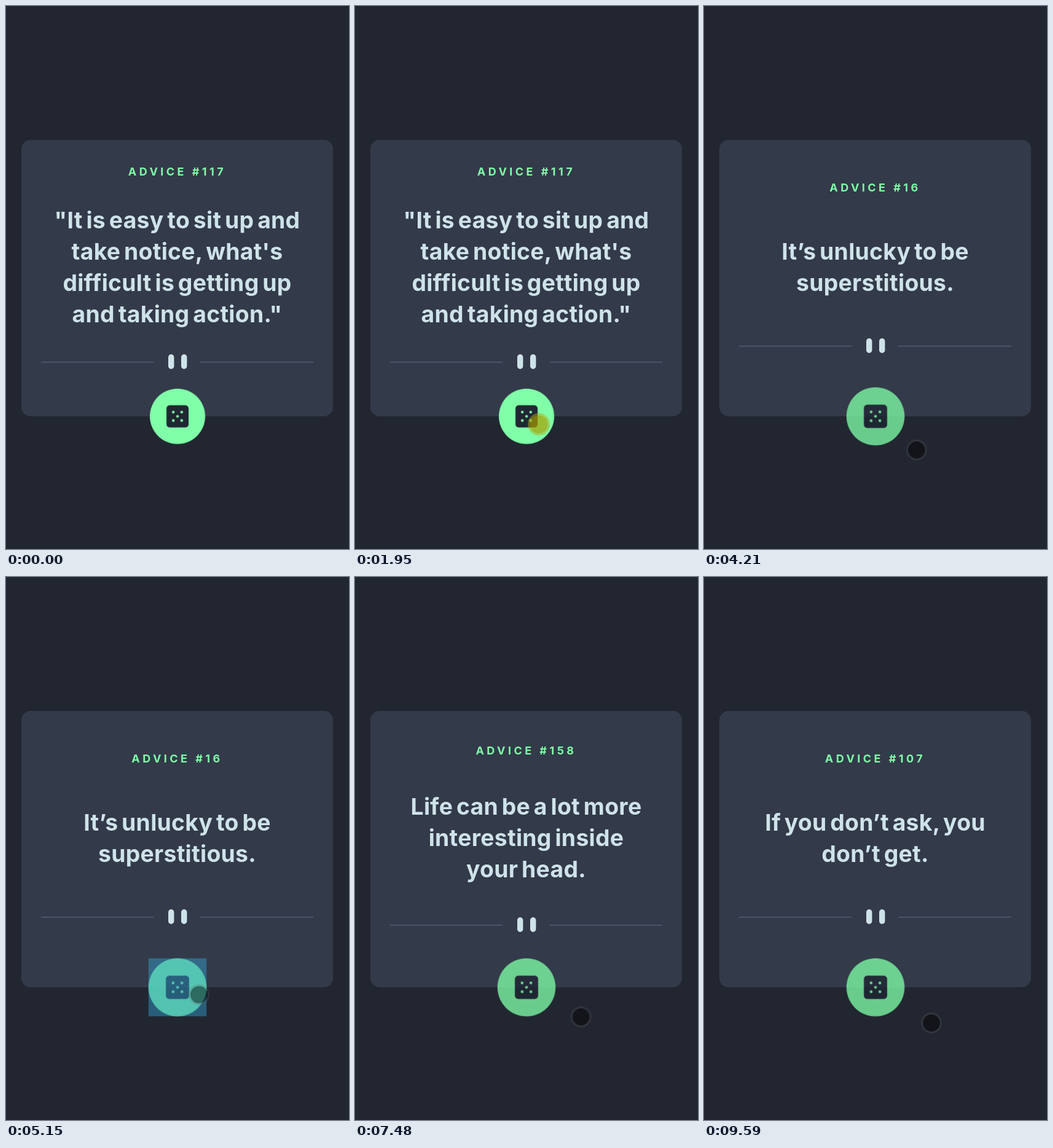
An HTML page that plays this animation: 558x884 px, repeating every 9.98 s.

```html
<!DOCTYPE html>
<html lang="en">
<head>
<meta charset="utf-8">
<title>Advice generator</title>
<style>
  html, body { margin: 0; width: 100%; height: 100%; overflow: hidden; background: #222631; }
  svg { display: block; width: 558px; height: 884px; }
  text { font-family: Inter, "Open Sans", sans-serif; text-anchor: middle; }
  .title { font-size: 18px; font-weight: 700; letter-spacing: 4.45px; fill: #80ffa8; }
  .quote { font-size: 37.3px; font-weight: 700; letter-spacing: .3px; word-spacing: -3.4px; fill: #cee3e9; }
  .rule { stroke: #4f5d74; stroke-width: 1.4; }
  .bar { fill: #cee3e9; }
  .page, #flash, #cursor, #press { opacity: 0; }
</style>
</head>
<body>
<svg id="stage" viewBox="0 0 558 884">
  <rect width="558" height="884" fill="#222631"/>
  <rect x="25" y="218" width="507" height="450" rx="15" fill="#333a49"/>
  <g id="pages"></g>
  <g transform="translate(279 668)">
    <g id="button">
      <circle r="45" fill="#80ffa8"/>
      <rect x="-18" y="-18" width="36" height="36" rx="5" fill="#202733"/>
      <g id="pips" fill="#80ffa8"></g>
    </g>
    <rect id="flash" x="-47.2" y="-47.2" width="94.4" height="94.4" fill="rgba(51,181,229,.4)"/>
  </g>
  <g id="cursor">
    <g id="idle">
      <circle r="14" fill="rgba(0,0,0,.45)"/>
      <circle r="15.4" fill="none" stroke="rgba(100,100,100,.25)" stroke-width="3"/>
    </g>
    <g id="press">
      <circle r="14.5" fill="rgba(165,158,0,.7)"/>
      <circle r="16.2" fill="none" stroke="rgba(175,165,20,.5)" stroke-width="3.4"/>
    </g>
  </g>
</svg>
<script>
const LOOP = 9980;
const $ = id => document.getElementById(id);

function add(parent, tag, attrs, text) {
  const el = document.createElementNS("http://www.w3.org/2000/svg", tag);
  for (const k in attrs) el.setAttribute(k, attrs[k]);
  if (text) el.textContent = text;
  return parent.appendChild(el);
}

// steps: [time, value, easing towards the next step]
function play(el, prop, steps, easing = "linear") {
  const last = steps[steps.length - 1];
  const all = [...steps];
  if (all[0][0] > 0) all.unshift([0, all[0][1]]);
  if (last[0] < LOOP) all.push([LOOP, last[1]]);
  const frames = all.map(([t, v, e]) => ({ offset: t / LOOP, [prop]: v, easing: e || easing }));
  const a = el.animate(frames, { duration: LOOP, iterations: Infinity });
  a.startTime = document.timeline.currentTime;
}

const hold = (el, steps) => play(el, "opacity", steps, "step-end");

const pages = [
  [0, "ADVICE #117", ["\"It is easy to sit up and", "take notice, what's", "difficult is getting up", "and taking action.\""]],
  [3150, "ADVICE #16", ["It’s unlucky to be", "superstitious."]],
  [5610, "ADVICE #158", ["Life can be a lot more", "interesting inside", "your head."]],
  [8820, "ADVICE #107", ["If you don’t ask, you", "don’t get."]]
];

pages.forEach(([start, title, lines], i) => {
  const missing = 4 - lines.length;
  const shift = missing * 13;
  const g = add($("pages"), "g", { class: "page" });
  add(g, "text", { class: "title", x: 278.5, y: 276 + shift }, title);
  lines.forEach((line, k) =>
    add(g, "text", { class: "quote", x: 278.5, y: 361.5 + missing * 25.5 + k * 51 }, line));
  const y = 579.7 - shift;
  for (const x of [57, 316.5])
    add(g, "line", { class: "rule", x1: x, x2: x + 183.5, y1: y, y2: y });
  for (const x of [264, 285])
    add(g, "rect", { class: "bar", x, y: y - 12.7, width: 9.4, height: 24, rx: 4.7 });
  const end = i < pages.length - 1 ? pages[i + 1][0] : LOOP;
  const steps = start ? [[0, 0], [start, 1]] : [[0, 1]];
  if (end < LOOP) steps.push([end, 0]);
  hold(g, steps);
});

for (const [cx, cy] of [[0, 0], [-1, -1], [1, -1], [-1, 1], [1, 1]])
  add($("pips"), "circle", { cx: cx * 6.8, cy: cy * 6.8, r: 2.2 });

// pointer path: time, x, y, easing
const path = [
  [530, 509, 880, "cubic-bezier(.3,.4,.5,1)"],
  [1470, 306, 696], [1670, 299, 681], [2440, 299, 681, "ease-in"],
  [2690, 325, 707, "ease-out"], [2950, 353, 730], [4150, 353, 730],
  [4210, 346, 723, "ease-out"], [4550, 314, 680], [5550, 314, 680],
  [5610, 322, 689, "ease-out"], [6020, 369, 717], [7420, 369, 717, "ease-in-out"],
  [8080, 289, 667], [8820, 289, 667, "ease-in-out"], [9590, 370, 726]
];
play($("cursor"), "transform", path.map(([t, x, y, e]) => [t, `translate(${x}px, ${y}px)`, e]));
hold($("cursor"), [[0, 0], [530, 1]]);

// each tap: finger down, finger up, highlight gone
const taps = [[1950, 2090, 2290], [5020, 5150, 5340], [8160, 8360, 8560]];
const down = [[0, 0]], up = [[0, 1]], glow = [[0, 0]];
for (const [a, b, c] of taps) {
  down.push([a, 1], [b, 0]);
  up.push([a, 0], [b, 1]);
  glow.push([b, 1], [c - 70, .5], [c, 0]);
}
hold($("press"), down);
hold($("idle"), up);
hold($("flash"), glow);

// the button keeps its hover look after the first tap
play($("button"), "transform", [[2090, "scale(1)", "ease"], [2290, "scale(1.05)"]]);
play($("button"), "opacity", [[2090, 1, "ease"], [2290, .77]]);
</script>
</body>
</html>
```
